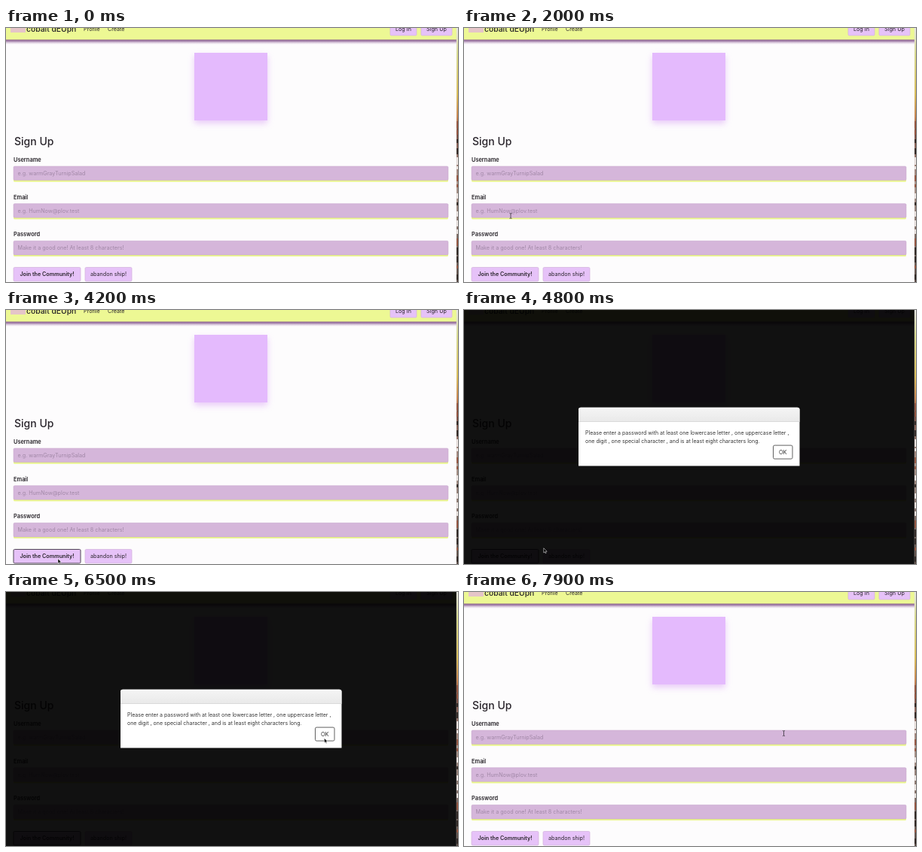
An HTML page for the animation above (8000 ms loop, 600 px wide and 338 px high).

```html
<!DOCTYPE html>
<html lang="en">
<head>
<meta charset="utf-8">
<title>Sign Up</title>
<style>
html, body { margin: 0; width: 100%; height: 100%; overflow: hidden; background: #fdfcfd; }
svg { display: block; width: 100vw; height: 100vh; font-family: Inter, "Open Sans", sans-serif; }
</style>
</head>
<body>
<svg id="stage" viewBox="0 0 600 338" preserveAspectRatio="none">
  <defs>
    <linearGradient id="navShade" x1="0" y1="0" x2="0" y2="1">
      <stop offset="0" stop-color="#7f5285"/>
      <stop offset=".35" stop-color="#9c76a2" stop-opacity=".9"/>
      <stop offset="1" stop-color="#d9c3de" stop-opacity="0"/>
    </linearGradient>
    <linearGradient id="bar" x1="0" y1="0" x2="0" y2="1">
      <stop offset="0" stop-color="#f5f5f5"/>
      <stop offset="1" stop-color="#e9e9e9"/>
    </linearGradient>
    <linearGradient id="photo" x1="0" y1="0" x2="0" y2="1">
      <stop offset="0" stop-color="#e4e4e0"/>
      <stop offset=".1" stop-color="#d5d886"/>
      <stop offset=".26" stop-color="#d8b94c"/>
      <stop offset=".35" stop-color="#c47a42"/>
      <stop offset=".41" stop-color="#6b3a2e"/>
      <stop offset=".6" stop-color="#a58d82"/>
      <stop offset="1" stop-color="#4a3a34"/>
    </linearGradient>
    <filter id="blur" x="-30%" y="-30%" width="160%" height="160%">
      <feGaussianBlur stdDeviation="4"/>
    </filter>
  </defs>
  <rect width="600" height="338" fill="#fdfcfd"/>
  <g id="page"></g>
  <rect id="dim" width="598" height="338" fill="#000"/>
  <g id="alert"></g>
  <g id="edge"></g>
  <g id="cursor">
    <circle id="ring" r="7.8" fill="#d5b6dc" fill-opacity=".75" stroke="#3b333e" stroke-width=".9"/>
    <path id="beam" d="M-1.5-3.5Q0-3.5 0-2.5Q0-3.5 1.5-3.5M0-2.5V2.5M-1.5 3.5Q0 3.5 0 2.5Q0 3.5 1.5 3.5"
      fill="none" stroke="#37323a" stroke-width=".8"/>
    <path id="arrow" d="M0 0V6.2L1.4 4.9L2.4 7L3.4 6.5L2.5 4.5H4.4Z"
      fill="#000" stroke="#fff" stroke-width=".5"/>
  </g>
</svg>
<script>
const LOOP = 8000, STEP = 100;
const $ = id => document.getElementById(id);

function add(parent, tag, attrs, content) {
  const el = document.createElementNS("http://www.w3.org/2000/svg", tag);
  for (const key in attrs) el.setAttribute(key, attrs[key]);
  if (content) el.textContent = content;
  return parent.appendChild(el);
}
const rect = (parent, x, y, width, height, fill, more) =>
  add(parent, "rect", { x, y, width, height, fill, ...more });
const text = (parent, x, y, size, content, fill = "#29242b", more) =>
  add(parent, "text", { x, y, "font-size": size, fill, ...more }, content);
const show = (el, on) => el.setAttribute("visibility", on ? "visible" : "hidden");

const page = $("page");
const middle = { "text-anchor": "middle" };

function button(x, y, w, h, label, weight = 400) {
  const box = rect(page, x, y, w, h, "#e6c2f8", { rx: 1.5, stroke: "#d3b2dc", "stroke-width": .7 });
  text(page, x + w / 2, y + h / 2 + 2.6, 7.2, label, "#29242b", { ...middle, "font-weight": weight });
  return box;
}

function field(y, label, hint) {
  text(page, 10, y - 6, 7.4, label, "#242026", { "font-weight": 600 });
  rect(page, 10, y + 3, 577, 17.8, "#ebf78c", { rx: 1.5 });
  rect(page, 10, y, 577, 18.6, "#d5b6da", { rx: 1.5, stroke: "#c4a5ca", "stroke-width": .5 });
  text(page, 15.5, y + 12, 7.2, hint, "#a087a6");
  return rect(page, 10, y, 577, 18.6, "none", { rx: 1.5, stroke: "#7f80c6", "stroke-width": 1.3 });
}

// Navigation
rect(page, 0, 15, 598, 7, "url(#navShade)");
rect(page, 0, 0, 598, 15.5, "#edf894");
rect(page, 6, -14, 20, 20, "#e5c5c8");
text(page, 27, 5, 10.3, "cobalt dEUph", "#242026", { "font-weight": 500 });
text(page, 103, 4, 7.15, "Profile");
text(page, 135, 4, 7.15, "Create");
button(510, -8, 35, 18, "Log In");
button(551, -8, 41, 18, "Sign Up");

// Hero
rect(page, 250, 37, 97, 90, "#e3bdf7", { filter: "url(#blur)", opacity: .8 });
rect(page, 250, 33, 97, 90, "#e4bafd");

// Form
text(page, 11, 155.5, 14, "Sign Up", "#29242b", { "font-weight": 500 });
field(184, "Username", "e.g. warmGrayTurnipSalad").remove();
const emailFocus = field(233.7, "Email", "e.g. HumNow@plov.test");
const passFocus = field(283.3, "Password", "Make it a good one! At least 8 characters!");
const joinBox = button(10, 318.5, 89, 18.5, "Join the Community!", 600);
button(105, 318.5, 62, 18.5, "abandon ship!");

function makeAlert(top, height, lines) {
  const g = add($("alert"), "g", {}), bottom = top + height;
  add(g, "path", { d: `M152 ${bottom}V${top + 3}q0-3 3-3H442.500q3 0 3 3V${bottom}Z`, fill: "#fff" });
  const bar = add(g, "path", { d: `M152 ${top + 19}V${top + 3}q0-3 3-3H442.500q3 0 3 3V${top + 19}Z`, fill: "url(#bar)" });
  rect(g, 152, top + 18.5, 293.5, .7, "#d2d2d2");
  lines.forEach((line, i) => text(g, 161, top + 36 + i * 11, 7, line, "#353535"));
  rect(g, 410.5, bottom - 27.3, 25.5, 18, "#fff", { rx: 1.8, stroke: "#505050", "stroke-width": .9 });
  text(g, 423.2, bottom - 15.6, 7.4, "OK", "#303030", middle);
  return { g, bar };
}
const passAlert = makeAlert(129.8, 77.6, [
  "Please enter a password with at least one lowercase letter , one uppercase letter ,",
  "one digit , one special character , and is at least eight characters long."
]);
const mailAlert = makeAlert(135.2, 66.8, ["Please enter a valid email"]);
mailAlert.bar.setAttribute("fill", "#f0f0f0");

// Sliver of the desktop on the right
rect($("edge"), 597.7, 0, .5, 338, "#e2dfe4", { opacity: .5 });
rect($("edge"), 598.2, 0, 1.8, 338, "url(#photo)");
for (let y = 124, seed = 7; y < 338; y += 12) {
  seed = (seed * 37 + 11) % 101;
  rect($("edge"), 598.2, y, 1.8, 4 + seed % 7, ["#efe9e6", "#2b2320", "#93523c"][seed % 3]);
}

// Keys: time, then values
const path = [[1200, 76, 346], [1900, 62, 250], [2600, 62, 250], [3000, 24, 287], [3400, 24, 287],
  [4100, 69, 331], [4500, 69, 331], [6000, 422.5, 194.500], [6900, 422.5, 194.5], [7200, 424.5, 189], [8000, 424.5, 188]];
const dimming = [[4300, 0], [4400, .84], [4500, .935], [6100, .935], [6200, .88], [6300, .935],
  [7100, .935], [7200, .84], [7300, .935], [7600, .935], [7700, .84], [7800, .4], [7900, 0]];

function sample(keys, t, ease = k => k) {
  if (t <= keys[0][0]) return keys[0].slice(1);
  const i = keys.findIndex(key => key[0] >= t);
  if (i < 0) return keys[keys.length - 1].slice(1);
  const a = keys[i - 1], b = keys[i], k = ease((t - a[0]) / (b[0] - a[0]));
  return a.slice(1).map((v, n) => v + (b[n + 1] - v) * k);
}
const smooth = k => k * k * (3 - 2 * k);
const within = (t, from, to) => t >= from && t < to;

function render(t) {
  const [x, y] = sample(path, t, smooth);
  $("dim").setAttribute("opacity", sample(dimming, t)[0]);
  show(emailFocus, within(t, 2400, 3200));
  show(passFocus, within(t, 3200, 4200));
  const pressed = within(t, 4200, 7800);
  joinBox.setAttribute("stroke", pressed ? "#514757" : "#d3b2dc");
  joinBox.setAttribute("stroke-width", pressed ? 1 : .7);
  show(passAlert.g, within(t, 4400, 7200));
  show(mailAlert.g, within(t, 7200, 7800));

  const overField = [184, 233.7, 283.3].some(top => y >= top && y <= top + 18.6);
  const beam = overField && !within(t, 4400, 7700);
  $("cursor").setAttribute("transform", `translate(${x} ${y})`);
  show($("beam"), beam);
  show($("arrow"), !beam);
  show($("ring"), within(t, 2300, 2500) || within(t, 3000, 3200));
}

const start = performance.now();
function tick() {
  const t = (performance.now() - start) % LOOP;
  render(Math.floor(t / STEP) * STEP);
  requestAnimationFrame(tick);
}
tick();
</script>
</body>
</html>
```
